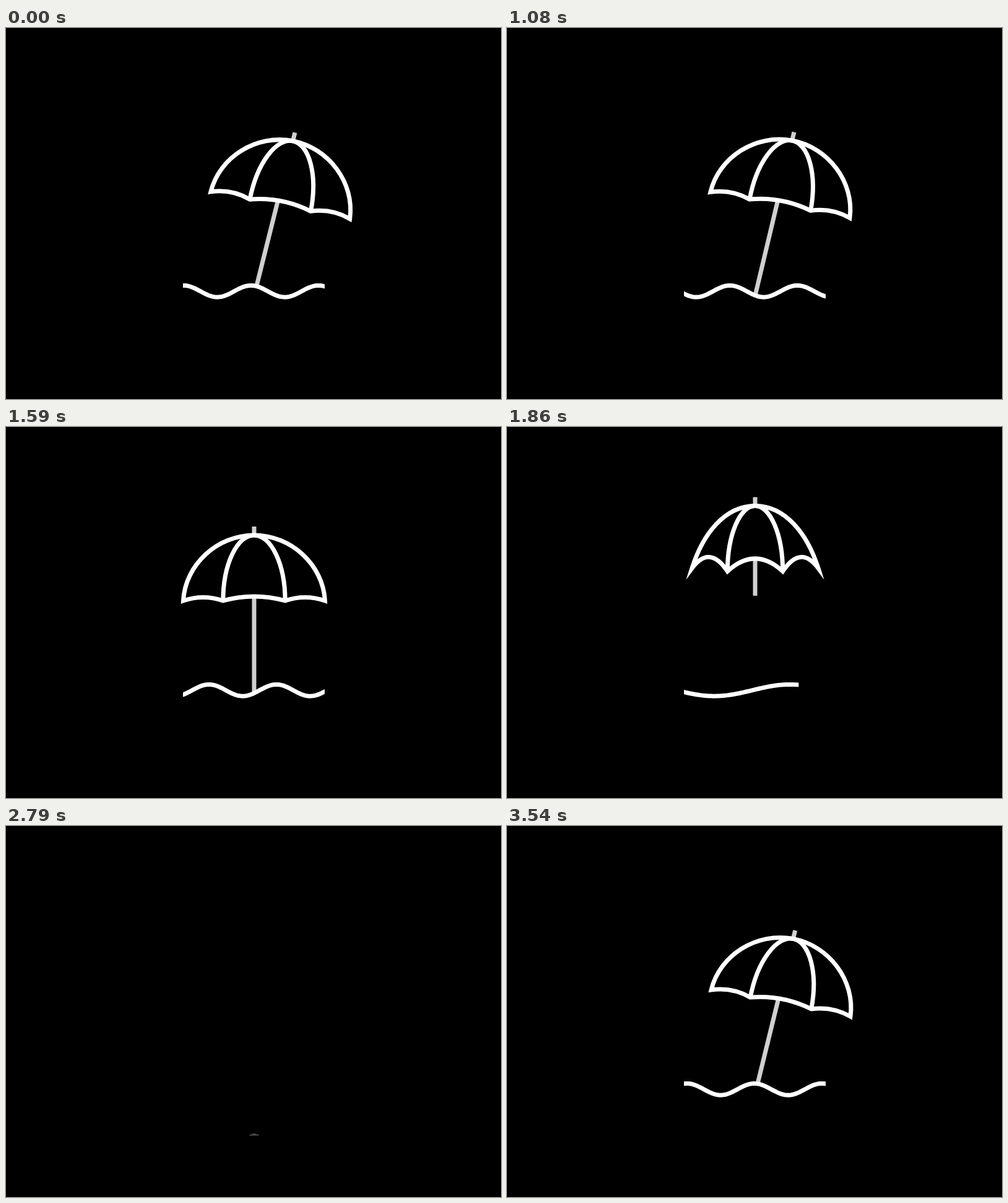
Recreate the animation shown at these times as an HTML page with a canvas. Size 800 by 600 pixels, loop 3570 ms.

```html
<!DOCTYPE html>
<html lang="en">
<head>
<meta charset="utf-8">
<title>Beach umbrella</title>
<style>
html, body { margin: 0; height: 100%; overflow: hidden; background: #000; }
canvas { display: block; }
</style>
</head>
<body>
<canvas width="800" height="600"></canvas>
<script>
const ctx = document.querySelector('canvas').getContext('2d');
const LOOP = 3570, LEAVE = 1050, ARRIVE = 2790, REST = 3900;
const CX = 401, PIVOT = 433, APEX = 258, TIP = 14, LEFT = 286, RADIUS = 114.5;

// Progress from 0 to 1 between times a and b, with easing.
const linear = (t, a, b) => Math.min(1, Math.max(0, (t - a) / (b - a)));
const easeIn = (t, a, b, power = 2) => linear(t, a, b) ** power;
const easeOut = (t, a, b, power = 2) => 1 - (1 - linear(t, a, b)) ** power;
const smooth = (t, a, b) => linear(t, a, b) ** 2 * (3 - 2 * linear(t, a, b));

// Straighten up, hop, fold and sink out of sight.
function leave(t) {
  return {
    tilt: 14.2 * (1 - linear(t, LEAVE, 1590)),
    apexY: 175 - 50.5 * smooth(t, 1590, 1830) + 350 * easeIn(t, 1840, 2070),
    half: RADIUS + 28 * Math.sin(2 * Math.PI * linear(t, 1600, 2055)),
    fold: smooth(t, 1720, 1860),
    scale: 1 - easeIn(t, 1880, 2070),
    pole: 272 - 118 * smooth(t, 1600, 1900),
    waveWidth: 229 * (1 - easeIn(t, 1730, 2030)),
    wavelength: 109 + 228 * smooth(t, 1590, 2070),
    phase: -0.76 + 0.00254 * (t - LEAVE)
  };
}

// Shoot up, pop open, land and lean over.
function arrive(t) {
  return {
    tilt: 14.2 * easeOut(t, 3300, 3650, 3),
    apexY: 500 - 375 * easeOut(t, ARRIVE, 3190) + 50 * easeIn(t, 3200, 3390),
    half: RADIUS + 28 * Math.sin(Math.PI * linear(t, 2920, 3320)) ** 2,
    fold: 1 - smooth(t, ARRIVE, 3120),
    scale: linear(t, 2770, 3090),
    pole: 154 + 118 * smooth(t, 3210, 3360),
    waveWidth: 229 * easeOut(t, 2960, 3270),
    wavelength: 109 + 228 * (1 - smooth(t, 2870, 3540)),
    phase: 0.24 - 0.285 * (Math.max(0, REST - t) / 360) ** 1.5
  };
}

function waveY(x, pose) {
  const turns = (x - LEFT) / pose.wavelength + pose.phase;
  return 425.8 - 9.4 * Math.cos(2 * Math.PI * turns);
}

function drawCanopy(half, fold) {
  const rib = half * 0.438, low = 106, bend = Math.abs(half - RADIUS);
  const edge = low - 0.4 * bend;
  const mid = (half + rib) / 2, side = (edge + low) / 2 - 11 - 30 * fold;
  const lean = half - 3 - 0.2 * bend - 12 * fold;
  const crown = half * (0.52 - 0.04 * fold);
  ctx.beginPath();
  ctx.moveTo(-half, edge);
  ctx.bezierCurveTo(-lean, edge * 0.45, -crown, 0, 0, 0);
  ctx.bezierCurveTo(crown, 0, lean, edge * 0.45, half, edge);
  ctx.quadraticCurveTo(mid, side, rib, low);
  ctx.quadraticCurveTo(0, low - 14 - 27 * fold, -rib, low);
  ctx.quadraticCurveTo(-mid, side, -half, edge);
  ctx.closePath();
  ctx.fill();
  ctx.stroke();
  ctx.beginPath();
  ctx.ellipse(0, low, rib, low, 0, Math.PI, 2 * Math.PI);
  ctx.stroke();
}

function drawUmbrella(pose) {
  if (pose.scale <= 0) return;
  const angle = pose.tilt * Math.PI / 180, base = PIVOT + pose.apexY - 175;
  let length = pose.pole;
  if (pose.scale === 1) {
    // The pole ends where it enters the sand.
    const toSand = (waveY(403, pose) - base) / Math.cos(angle) + APEX + TIP;
    length = Math.min(length, toSand);
  }
  ctx.save();
  ctx.translate(CX, base);
  ctx.rotate(angle);
  ctx.translate(0, -APEX);
  ctx.scale(pose.scale, pose.scale ** 1.4);
  ctx.fillStyle = '#d0d0d0';
  ctx.fillRect(-3.5, -TIP, 7, length);
  ctx.rotate(-0.215 * angle);
  ctx.fillStyle = '#000';
  drawCanopy(pose.half, pose.fold);
  ctx.restore();
}

function drawWave(pose) {
  const width = pose.waveWidth;
  if (width <= 0) return;
  ctx.save();
  ctx.beginPath();
  ctx.rect(LEFT, 400, width, 50);
  ctx.clip();
  ctx.beginPath();
  for (let x = -6; x <= width + 6; x += 2) ctx.lineTo(LEFT + x, waveY(LEFT + x, pose));
  ctx.stroke();
  ctx.restore();
}

function frame() {
  let t = performance.now() % LOOP;
  if (t < LEAVE) t += LOOP;
  const pose = t < 2400 ? leave(t) : arrive(t);
  ctx.fillStyle = '#000';
  ctx.fillRect(0, 0, 800, 600);
  ctx.strokeStyle = '#fff';
  ctx.lineWidth = 7;
  drawUmbrella(pose);
  drawWave(pose);
  requestAnimationFrame(frame);
}
frame();
</script>
</body>
</html>
```
